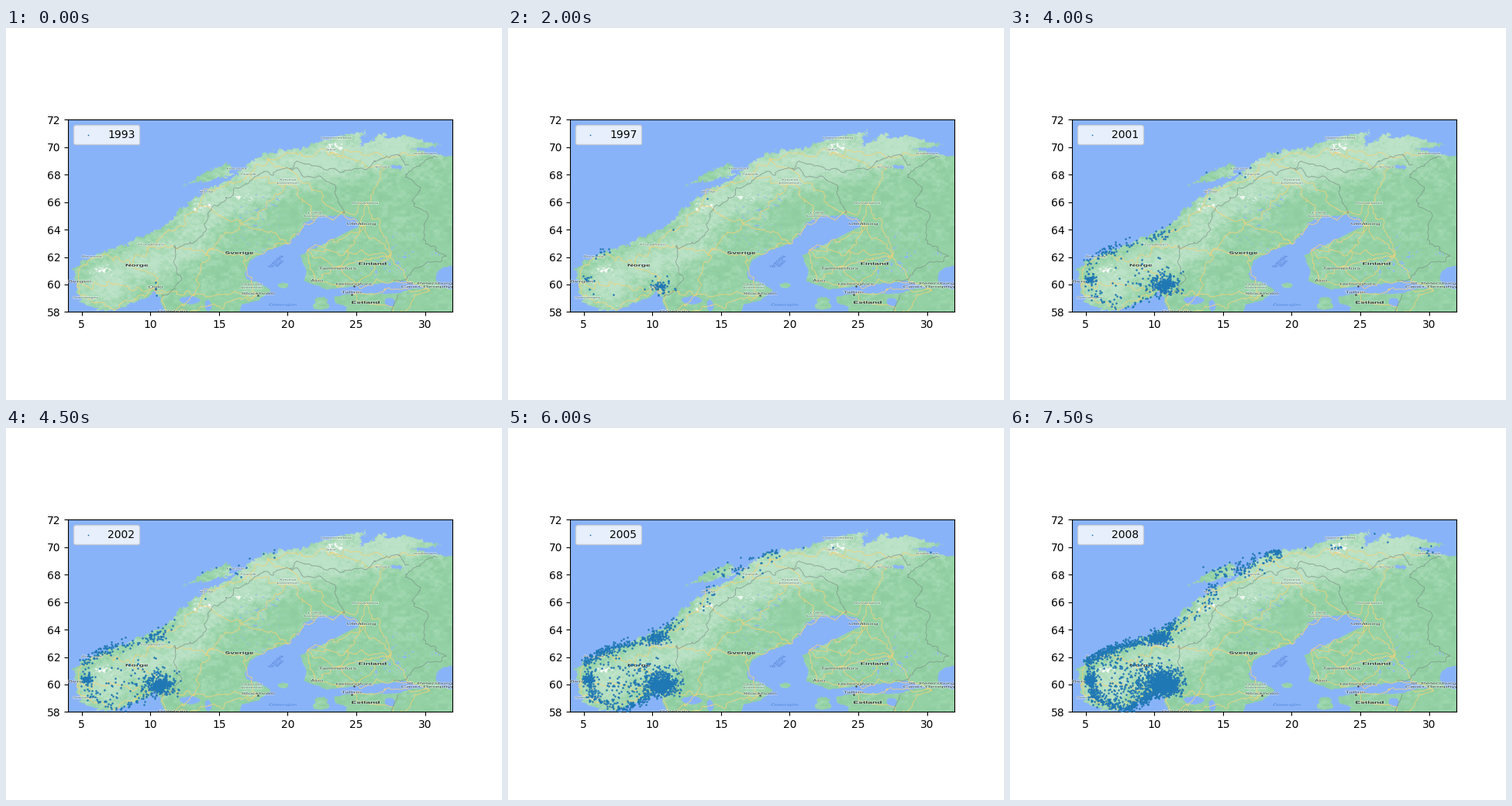
A matplotlib script for the animation above (8000 ms loop, 640x480 px).

```python
import numpy as np
import matplotlib.pyplot as plt
from matplotlib.animation import FuncAnimation
from matplotlib.patches import PathPatch
from matplotlib.path import Path
from matplotlib.textpath import TextPath
from matplotlib.transforms import Affine2D

FIRST, LAST = 1993, 2008
PX = 28 / 496        # axis units per pixel
SQUASH = 0.45        # the map sheet is flattened to fill the axes
WATER, BASE, PALE, SNOW = "#8ab4f8", "#94d2a5", "#bce2c7", "#fafcfa"

# lon, lat
NORWAY = [
    (6.5, 58.05), (5.6, 58.6), (5.2, 59.4), (4.95, 60.6), (4.98, 61.7), (5.7, 62.35),
    (7.3, 63.05), (8.7, 63.65), (10.4, 64.5), (11.6, 65.05), (12.2, 66), (13.6, 67),
    (15, 67.75), (16.2, 68.2), (17, 69), (18.9, 69.95), (21.3, 70.2), (23.6, 70.8),
    (25.7, 71.18), (25.3, 70.2), (27, 71.05), (27.5, 70.7), (28.6, 70.9), (31.1, 70.35),
    (29, 70.1), (30.8, 69.78), (33, 69.6)]
BALTIC = [
    (33, 59.9), (30.3, 59.93), (28.6, 60.6), (25, 60.15), (23, 59.85), (21.4, 60.6),
    (21.5, 61.5), (21.1, 62.7), (22.9, 63.7), (25.2, 64.95), (25.2, 65.5), (24.2, 65.8),
    (22.6, 65.75), (21.5, 65.25), (21, 64.5), (20.2, 63.65), (18.8, 63.15), (17.5, 62.3),
    (17.15, 61.4), (17.2, 60.75), (17.9, 60.55), (19, 59.8), (18.2, 58.95), (16.9, 58.5),
    (16.6, 57.5)]
SKAGERRAK = [(11.8, 57.5), (11.2, 58.4), (10.75, 59.85), (10.3, 59.15), (9.5, 58.85), (7.9, 58.05)]
ESTONIA = [(33, 60.1), (29.2, 59.95), (28, 59.48), (25, 59.52), (23.5, 59.2), (23.6, 58.6),
           (24.5, 58.3), (24.3, 57.5), (33, 57.5)]
LOFOTEN = [(12.85, 67.85), (14.7, 68.2), (16.3, 68.55), (16, 69.25), (14.4, 68.7)]
RANGE = [(6.8, 59.5), (8.2, 61.4), (12.5, 63.2), (14.8, 66), (18.5, 68.5), (28, 70.3)]
GLACIERS = [(6.9, 61.5), (13.9, 66.4), (16.8, 67), (23.5, 70.2)]
# lon, lat, half width and height in pixels
ISLANDS = [(22.6, 58.9, 8, 4), (22.6, 58.4, 11, 5), (19.9, 60.2, 7, 3)]
LAKES = [(13.2, 58.9, 13, 5), (14.5, 58.4, 4, 8), (32, 60.9, 22, 15), (27.5, 58.7, 7, 6),
         (28, 69, 8, 3)]
BORDERS = [
    [(11.1, 59), (12.5, 60.6), (12.1, 62.2), (12, 63.4), (14.1, 64.1), (14.5, 66),
     (16.3, 67.5), (18.2, 68.5), (21.3, 69.3), (23.8, 68.75), (25.8, 69), (27.9, 70.08),
     (28.9, 69.05)],
    [(20.3, 69.05), (23.6, 67.9), (24.15, 65.8)],
    [(30.8, 69.8), (28.5, 68.5), (29.9, 67.7), (29.1, 66.9), (30.1, 65.7), (30, 63.7),
     (31.5, 62.9), (27.8, 60.55)],
    [(28.1, 59.4), (27.5, 57.9)]]

PLACES = dict(
    Oslo=(10.75, 59.91), Bergen=(5.32, 60.39), Stavanger=(5.73, 58.97), Trondheim=(10.4, 63.43),
    Ålesund=(6.15, 62.47), Bodø=(14.4, 67.28), Narvik=(17.43, 68.44), Harstad=(16.54, 68.8),
    Tromsø=(18.95, 69.65), Alta=(23.27, 69.97), Hammerfest=(23.68, 70.66),
    Kirkenes=(30.05, 69.73), Hamar=(11.1, 60.8), Dombås=(9.1, 62.1), Kristiansand=(8, 58.15),
    Skien=(9.6, 59.2), Mo=(14.1, 66.3), Namsos=(11.5, 64.45), Molde=(7.2, 62.75),
    Stad=(5.2, 61.9), Svolvær=(14.4, 68.25), Göteborg=(11.97, 57.7), Karlstad=(13.5, 59.4),
    Stockholm=(18.07, 59.33), Uppsala=(17.64, 59.86), Linköping=(15.6, 58.4),
    Sundsvall=(17.3, 62.4), Umeå=(20.26, 63.83), Luleå=(22.15, 65.58), Kiruna=(20.22, 67.86),
    Östersund=(14.6, 63.2), Storuman=(17.1, 65.1), Haparanda=(24.1, 65.85),
    Helsingfors=(24.94, 60.17), Åbo=(22.27, 60.45), Tammerfors=(23.76, 61.5), Vasa=(21.7, 63.05),
    Uleåborg=(25.47, 65.01), Rovaniemi=(25.73, 66.5), Enare=(27.03, 68.9), Kuopio=(27.7, 62.9),
    Viborg=(28.7, 60.7), Tallinn=(24.75, 59.44), Petersburg=(30.33, 59.93), Pskov=(28.3, 57.8))
ROADS = """Oslo-Hamar-Dombås-Trondheim-Namsos-Mo-Bodø-Narvik-Tromsø-Alta-Kirkenes
Oslo-Skien-Kristiansand-Stavanger-Bergen-Stad-Ålesund-Molde-Dombås
Bergen-Oslo-Göteborg
Oslo-Karlstad-Stockholm-Uppsala-Sundsvall-Umeå-Luleå-Haparanda-Uleåborg
Stockholm-Linköping-Göteborg-Karlstad-Östersund-Storuman-Kiruna-Narvik
Sundsvall-Östersund-Trondheim
Umeå-Storuman-Mo
Luleå-Kiruna
Helsingfors-Tammerfors-Uleåborg-Rovaniemi-Enare-Alta
Helsingfors-Åbo-Vasa-Uleåborg-Kuopio-Viborg
Åbo-Tammerfors-Vasa-Kuopio-Tammerfors
Helsingfors-Kuopio-Rovaniemi-Haparanda
Helsingfors-Viborg-Petersburg-Tallinn-Pskov-Petersburg
Haparanda-Tromsø""".split("\n")
CITIES = "Oslo Stockholm Helsingfors Tallinn Tammerfors Åbo Uleåborg Bergen Göteborg Petersburg".split()
TOWNS = ("Stavanger Trondheim Ålesund Bodø Rovaniemi Luleå Alta Hammerfest Narvik Harstad "
         "Kiruna Enare Kirkenes Uppsala").split()
CAPTIONS = dict(Petersburg="St. Petersburg\nСанкт-Петербург", Uppsala="Uppsala\nkommun",
                Kiruna="Kiruna\nkommun", Luleå="Luleå\nkommun")
COUNTRIES = dict(Norge=(169, 306), Sverige=(301, 290), Finland=(473, 304), Estland=(464, 354))

# ends of a strip, spread, count, first year
STRIPS = [
    ("Oslo", "Oslo", .42, 520, 1994), ("Oslo", "Oslo", .8, 420, 1995),
    ("Hamar", "Skien", .8, 330, 1998), ("Bergen", "Bergen", .22, 200, 1995),
    ("Bergen", "Stavanger", .25, 100, 1996), ("Bergen", "Stad", .3, 70, 1996),
    ("Stad", "Molde", .35, 180, 1994), ("Molde", "Trondheim", .35, 140, 1998),
    ("Trondheim", "Trondheim", .5, 210, 1999), ("Trondheim", "Namsos", .35, 80, 1999),
    ("Namsos", "Mo", .5, 30, 2001), ("Mo", "Bodø", .4, 26, 2002),
    ("Svolvær", "Narvik", .5, 64, 2000), ("Harstad", "Tromsø", .45, 50, 2001),
    ("Tromsø", "Tromsø", .25, 26, 2001), ("Alta", "Alta", .3, 7, 2003),
    ("Kirkenes", "Kirkenes", .4, 6, 2003), ("Stavanger", "Kristiansand", .35, 100, 1998),
    ("Kristiansand", "Skien", .3, 130, 1999), ("Stavanger", "Hamar", 1, 210, 1997),
    ("Stad", "Hamar", .8, 130, 1998)]
# lon, lat, first year
SINGLES = [(10.38, 60.17, 1993), (10.42, 59.22, 1993), (10.4, 59.7, 1993), (11.5, 64, 1996),
           (14, 66.25, 1997), (13.75, 68.2, 1999), (18.95, 69.62, 1999), (21, 70, 2003),
           (23.6, 70.65, 2007), (25.1, 70, 2007), (26, 71, 2008), (26.95, 70.4, 2008)]


def project(points):
    """Mercator lon/lat to axis units of the squashed map."""
    lon, lat = np.array(points, float).T
    m = np.log(np.tan(np.pi / 4 + np.radians(lat) / 2))
    return np.column_stack([1.0184 * lon - 0.567, 23.823 * m + 28.36])


def rgb(color):
    return np.array(plt.matplotlib.colors.to_rgb(color))


def noise(u, v, seed):
    """Smooth value noise in -1..1."""
    g = np.random.default_rng(seed).uniform(-1, 1, (256, 256))
    i, j = np.floor(u).astype(int), np.floor(v).astype(int)
    a, b = u - i, v - j
    a, b = a * a * (3 - 2 * a), b * b * (3 - 2 * b)
    at = lambda p, q: g[p % 256, q % 256]
    return ((1 - b) * ((1 - a) * at(i, j) + a * at(i + 1, j))
            + b * ((1 - a) * at(i, j + 1) + a * at(i + 1, j + 1)))


def densify(line, step=0.12):
    p = project(line)
    d = np.r_[0, np.cumsum(np.hypot(*np.diff(p, axis=0).T))]
    t = np.linspace(0, d[-1], int(d[-1] / step) + 2)
    return np.column_stack([np.interp(t, d, p[:, k]) for k in (0, 1)])


def terrain():
    W, H = 992, 496
    x, y = np.meshgrid(4 + (np.arange(W) + .5) * 28 / W, 72 - (np.arange(H) + .5) * 14 / H)
    u, v = x / PX, y / PX
    fine = noise(u / 2.2, v / 1.6, 1)
    mid = noise(u / 6, v / 4, 2)
    wide = noise(u / 22, v / 14, 3)
    streak = noise((u - v) / 4, (u + 2 * v) / 3.2, 4)   # valleys run north-west to south-east

    # ragged fjords along the ocean, calmer shores in the Baltic
    rough = .8 + 2.4 * np.clip((v - .5 * u - 935) / 40, 0, 1)
    wx = x + PX * rough * (noise(u / 5, v / 4, 5) + .8 * noise(u / 2, v / 2, 6))
    wy = y + PX * rough * .7 * (noise(u / 5, v / 4, 7) + .8 * noise(u / 2, v / 2, 8))
    samples = np.column_stack([wx.ravel(), wy.ravel()])

    def inside(ring):
        return Path(project(ring)).contains_points(samples).reshape(H, W)

    def reach(lon, lat, rx, ry):
        cx, cy = project([(lon, lat)])[0]
        return ((wx - cx) / rx / PX) ** 2 + ((wy - cy) / ry / PX) ** 2

    land = inside(NORWAY + BALTIC + SKAGERRAK) | inside(ESTONIA) | inside(LOFOTEN)
    for spot in ISLANDS:
        land |= reach(*spot) < 1
    for spot in LAKES:
        land &= reach(*spot) > 1

    dist = np.full((H, W), np.inf)
    for rx, ry in densify(RANGE, .5):
        dist = np.minimum(dist, (x - rx) ** 2 + ((y - ry) * 1.2) ** 2)
    high = np.exp(-dist / (34 * PX) ** 2)

    # small lakes
    lakeland = np.exp(-reach(27.6, 62.2, 45, 32))
    land &= (.8 * fine + .5 * mid + .5 * lakeland < 1.07) | (high > .5)
    sweden = np.exp(-reach(17.5, 65.5, 60, 45)) * (1 - .5 * high)
    land &= (streak > -.76) | (sweden + .3 * wide < .55)

    light = .95 * high + .25 * wide + .3 * mid + .24 * fine + .2 * streak * high
    light = np.clip(light + np.clip((y - 66) / 20, 0, .25) - .06, 0, 1)[..., None]
    ground = rgb(BASE) + (rgb(PALE) - rgb(BASE)) * light
    ground -= .022 * (np.clip(-mid - .2 * fine, 0, 1) * (1 - high))[..., None]

    ice = sum(np.exp(-reach(*spot, 15, 6)) for spot in GLACIERS)
    snow = .8 * np.clip(ice, 0, 1) + .5 * streak + .35 * fine + .12 * high
    ground += (rgb(SNOW) - ground) * np.clip((snow - .74) * 4, 0, 1)[..., None]
    return np.clip(np.where(land[..., None], ground, rgb(WATER)), 0, 1)


def draw_line(line, color, width, wobble):
    p = densify(line)
    u, v = p.T / PX
    bend = np.column_stack([noise(u / 9, v / 9, 11) + .4 * noise(u / 3, v / 3, 13),
                            noise(u / 9, v / 9, 12) + .4 * noise(u / 3, v / 3, 14)])
    ax.plot(*(p + wobble * bend).T, color=color, lw=width, alpha=.8)


def label(text, x, y, size, color, weight="normal", angle=0, halo=.45):
    path = TextPath((0, 0), text, size=size, prop=dict(family="Liberation Sans", weight=weight))
    box = path.get_extents()
    place = (Affine2D().translate(-(box.x0 + box.x1) / 2, -size * .35).rotate_deg(angle)
             .scale(PX, PX * SQUASH).translate(x, y))
    path = place.transform_path(path)
    if halo:
        ax.add_patch(PathPatch(path, fc="none", ec="white", lw=1.1, alpha=halo, zorder=4))
    ax.add_patch(PathPatch(path, fc=color, lw=0, zorder=5))


def label_place(name, size, color):
    x, y = project([PLACES[name]])[0]
    for k, text in enumerate(reversed(CAPTIONS.get(name, name).split("\n"))):
        label(text, x, y + (3 + 4.4 * k) * PX, size, color)


def stage(px, py):
    return 4 + (px - 80) * PX, 58 + (366.4 - py) * PX


def sightings():
    """Positions and the year each one first shows up."""
    rng = np.random.default_rng(7)
    rows = [np.array(SINGLES)]
    for a, b, spread, n, start in STRIPS:
        a, b = np.array(PLACES[a]), np.array(PLACES[b])
        spots = a + (b - a) * rng.random((n, 1)) + rng.normal(size=(n, 2)) * spread * [.8, .5]
        rank = np.arange(1, n + 1) / n
        year = np.ceil(start - 1 + (LAST - start + 1) * np.sqrt(rank))
        rows.append(np.column_stack([spots, year]))
    lon, lat, year = np.vstack(rows).T
    sea = (lon < 4.85) | ((lon > 9.7) & (lat < 58.95)) | (lat > 61.9 + .55 * (lon - 4.9))
    east = (lat < 62.2) & (lon > 12.3)
    keep = ~(sea | east) | (lat > 65)
    return np.column_stack([lon, lat])[keep], year[keep]


fig, ax = plt.subplots(figsize=(6.4, 4.8), dpi=100)
ax.imshow(terrain(), extent=(4, 32, 58, 72))

for road in ROADS:
    draw_line([PLACES[name] for name in road.split("-")], "#f3d27a", .75, .3)
for border in BORDERS:
    draw_line(border, "#7c8f86", .6, .25)
for name, spot in COUNTRIES.items():
    label(name, *stage(*spot), 10.3, "#202622", "bold")
for name in CITIES:
    label_place(name, 9.3, "#3a423e")
for name in TOWNS:
    label_place(name, 7.3, "#5e6f68")
label("Bottniska", *stage(348, 301), 9, "#4f7fd6", angle=65, halo=0)
label("viken", *stage(352, 304), 9, "#4f7fd6", angle=65, halo=0)
label("Östersjön", *stage(357, 357), 8.4, "#4f7fd6", halo=0)
capitals = project([PLACES[name] for name in ("Oslo", "Stockholm", "Helsingfors", "Tallinn")])
ax.scatter(*capitals.T, s=3, color="#4a3f3f", lw=0, zorder=5)

spots, years = sightings()
dots = ax.scatter([], [], s=1, c="C0", linewidths=.8, zorder=6, label=str(FIRST))
legend = ax.legend(loc="upper left")
legend.legend_handles[0].set_linewidth(.2)
legend.set_zorder(8)
ax.set(xlim=(4, 32), ylim=(58, 72))


def update(i):
    dots.set_offsets(spots[years <= FIRST + i])
    legend.get_texts()[0].set_text(str(FIRST + i))
    return dots, legend


anim = FuncAnimation(fig, update, frames=LAST - FIRST + 1, interval=500, repeat=True, repeat_delay=0)
plt.show()
```
